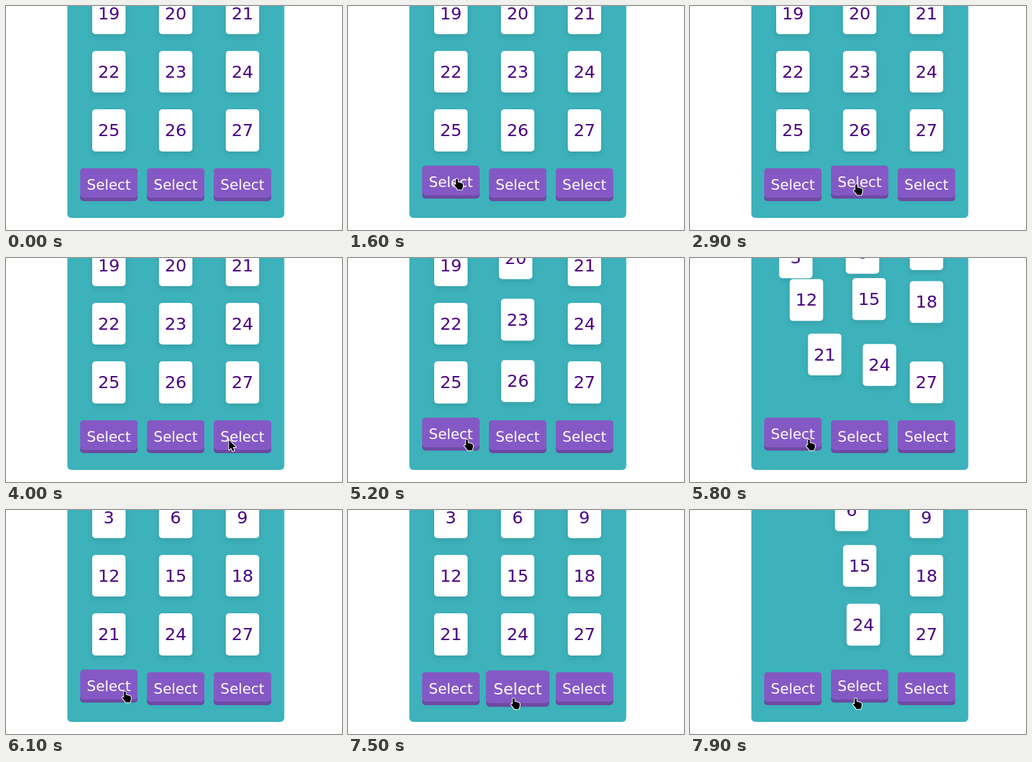
An HTML page with a canvas that plays this animation: 503x334 px, repeating every 8000 ms.

```html
<!DOCTYPE html>
<html lang="en">
<head>
<meta charset="utf-8">
<title>Card columns</title>
<style>
  html, body { margin: 0; width: 100%; height: 100%; overflow: hidden; background: #fff; }
  canvas { display: block; }
</style>
</head>
<body>
<canvas id="stage" width="503" height="334"></canvas>
<script>
const ctx = document.getElementById('stage').getContext('2d');
const LOOP = 8000, STEP = 100;
const FONT = '"DejaVu Sans", sans-serif';
const CARD = { w: 50, h: 62.4, time: 480, stagger: 19.15 };
const PITCH = { x: 100, y: 87.3 };
const BUTTON = { x: 154, y: 266.5, w: 86, h: 49, lip: 5, lift: 3.7 };

// Cards are gathered column by column, then dealt again row by row.
const gather = (deck, cols) => cols.flatMap(c => deck.filter((_, i) => i % 3 === c));
const first = Array.from({ length: 27 }, (_, i) => i + 1);
const second = gather(first, [1, 0, 2]);
const third = gather(second, [0, 1, 2]);
const deals = [
  { start: 5026, from: first, to: second },
  { start: 7495, from: second, to: third }
];

// Cursor moves: each glides from the last place to x, y.
const entry = { at: 500, x: 6, y: 244 };
const moves = [
  { at: 500, end: 700, x: 44, y: 221 },
  { at: 900, end: 1600, x: 164, y: 257 },
  { at: 2750, end: 2900, x: 250, y: 265 },
  { at: 3100, end: 3400, x: 351, y: 266 },
  { at: 3600, end: 4000, x: 333, y: 270 },
  { at: 4000, end: 4300, x: 206, y: 270 },
  { at: 4300, end: 4500, x: 179, y: 270 },
  { at: 6700, end: 7100, x: 249, y: 280 }
];

const mix = (a, b, p) => a + (b - a) * p;
const clamp = v => Math.min(1, Math.max(0, v));
const ease = p => p < 0.5 ? 2 * p * p : 1 - 2 * (1 - p) * (1 - p);
const glide = (a, b, p) => ({ x: mix(a.x, b.x, p), y: mix(a.y, b.y, p) });
const slot = i => ({
  x: 129 + PITCH.x * (i % 3),
  y: 154.2 - PITCH.y * (8 - Math.floor(i / 3))
});

const cursorAt = t => moves.reduce(
  (pos, m) => glide(pos, m, ease(clamp((t - m.at) / (m.end - m.at)))), entry);

function buttonAt({ x, y }) {
  if (Math.abs(y - BUTTON.y) > BUTTON.h / 2) return -1;
  return [0, 1, 2].findIndex(i => Math.abs(x - BUTTON.x - PITCH.x * i) <= BUTTON.w / 2);
}

function box(x, y, w, h, r, color) {
  ctx.beginPath();
  ctx.roundRect(x, y, w, h, r);
  ctx.fillStyle = color;
  ctx.fill();
}

function label(text, x, y, size, color) {
  ctx.font = size + 'px ' + FONT;
  ctx.textAlign = 'center';
  ctx.fillStyle = color;
  ctx.fillText(text, x, y);
}

function drawCard(n, { x, y }, still) {
  const snap = v => still ? Math.round(v) : v;
  const top = snap(y);
  ctx.save();
  ctx.shadowColor = 'rgba(0,0,0,0.1)';
  ctx.shadowBlur = 8;
  ctx.shadowOffsetY = 4;
  box(x, top, CARD.w, snap(y + CARD.h) - top, 5, '#fff');
  ctx.restore();
  label(n, x + CARD.w / 2, snap(y + CARD.h / 2 + 8.8), 25.6, '#4b0082');
}

function drawCards(t) {
  const { start, from, to } = t < deals[1].start ? deals[0] : deals[1];
  to.forEach((n, i) => {
    const p = ease(clamp((t - start - i * CARD.stagger) / CARD.time));
    drawCard(n, glide(slot(from.indexOf(n)), slot(i), p), p === 0 || p === 1);
  });
}

function drawButton(i, hover, pressed) {
  const { w, h, lip } = BUTTON;
  ctx.save();
  ctx.translate(BUTTON.x + PITCH.x * i, BUTTON.y - (hover && !pressed ? BUTTON.lift : 0));
  if (pressed) ctx.scale(1.1, 1.1);
  box(-w / 2, -h / 2, w, h, 5, '#6d4aa3');
  box(-w / 2, -h / 2, w, h - lip, 5, '#8559c5');
  label('Select', 0, 7.5, 21.33, '#fff');
  ctx.restore();
}

const ARROW = new Path2D('M.8 1.5V16L4 13L6.3 18L8.8 17L6.6 12H11.2Z');
const HAND = new Path2D('M-2.5 2Q-2.5 .8 -1 .8Q.5 .8 .5 2V6Q2 5.4 3 6.5Q4.6 6 5.4 7.2' +
  'Q8 6.8 8 9V12Q8 14 6.8 15V16.7H-.4V15.2Q-2.6 13.5 -4.6 10.6Q-5 9 -3.6 8.8L-2.5 10Z');

function drawCursor({ x, y }, shape) {
  ctx.save();
  ctx.translate(Math.round(x), Math.round(y));
  ctx.lineJoin = 'round';
  ctx.lineWidth = 2;
  ctx.strokeStyle = '#fff';
  ctx.stroke(shape);
  ctx.fillStyle = '#000';
  ctx.fill(shape);
  ctx.restore();
}

function draw(t) {
  // The page reacts one step before the drawn cursor gets there.
  const hover = buttonAt(cursorAt(t + STEP));
  const pressed = deals.some(d => Math.abs(t - d.start) < STEP / 2);
  ctx.fillStyle = '#fff';
  ctx.fillRect(0, 0, 503, 334);
  box(91.8, -20, 324.8, 336, 6, '#3db2bb');
  drawCards(t);
  for (let i = 0; i < 3; i++) drawButton(i, hover === i, pressed && hover === i);
  if (t >= entry.at) drawCursor(cursorAt(t), hover < 0 ? ARROW : HAND);
}

const begin = performance.now();
function tick() {
  const t = (performance.now() - begin) % LOOP;
  draw(Math.floor(t / STEP) * STEP);
  requestAnimationFrame(tick);
}
tick();
</script>
</body>
</html>
```
